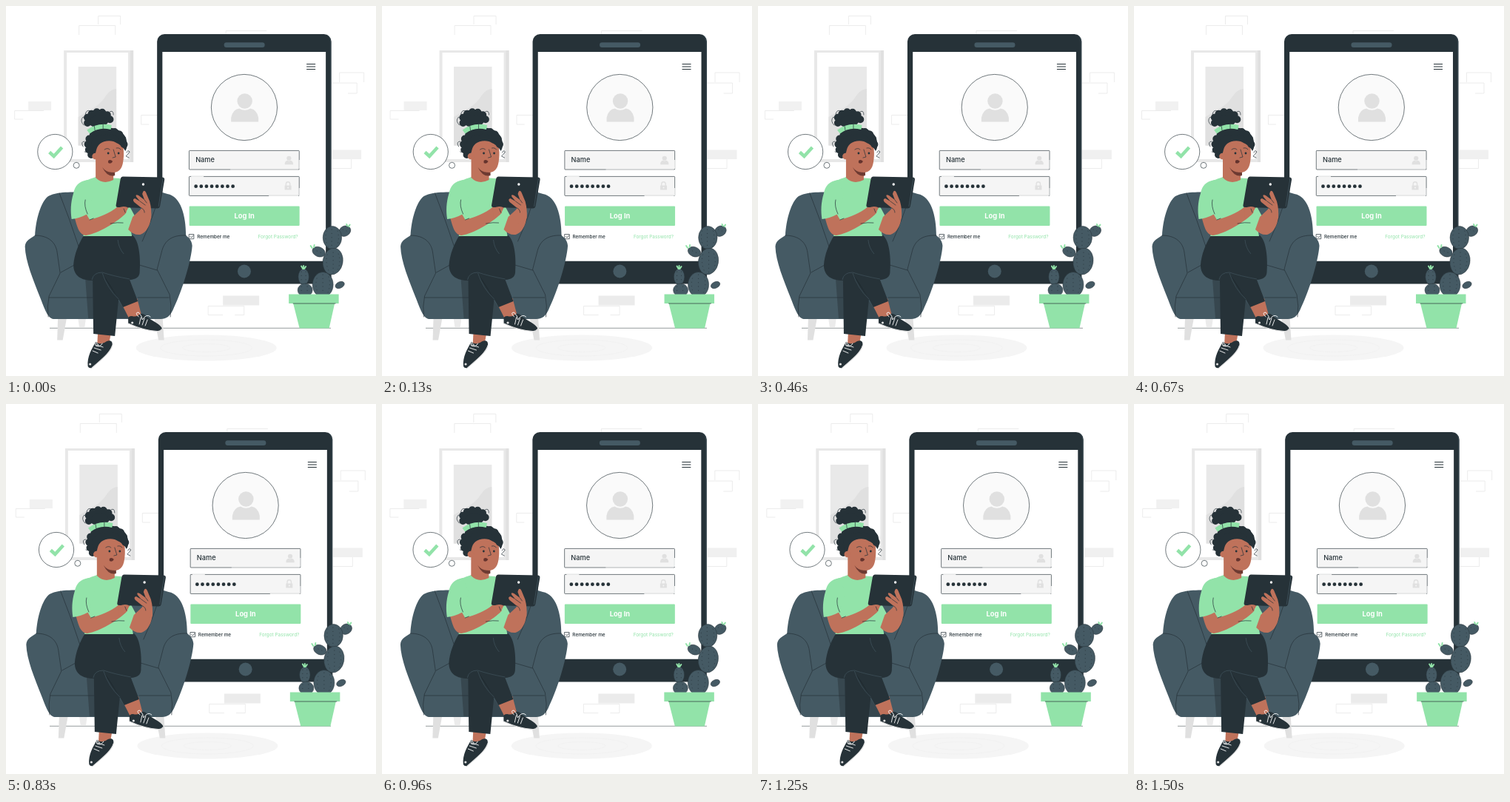
These frames come from a looping animation (500x500 px, 1540 ms). An HTML page:

```html
<!DOCTYPE html>
<html lang="en">
<head>
<meta charset="utf-8">
<title>Login illustration</title>
<style>
  html, body { margin: 0; width: 100%; height: 100%; overflow: hidden; background: #fff; }
  svg { display: block; width: 100vw; height: 100vh; }
  text { font-family: Inter, Roboto, sans-serif; }
  .dark { fill: #263238; }
  .slate { fill: #455a64; }
  .green { fill: #92e3a9; }
  .skin { fill: #bf725b; }
  .pale { fill: #e0e0e0; }
  .line { fill: none; stroke: #263238; stroke-width: .7; stroke-linecap: round; stroke-linejoin: round; }
  .lace { fill: none; stroke: #fff; stroke-width: .9; stroke-linecap: round; }
  .sole { fill: none; stroke: #e0e0e0; stroke-width: 1.2; stroke-linecap: round; }
  .brick { fill: none; stroke: #e8e8e8; stroke-width: .8; }
  .curls { fill: none; stroke: #263238; stroke-width: 10; stroke-linecap: round; stroke-dasharray: 0 7.5; }
</style>
</head>
<body>
<svg viewBox="0 0 500 500">
  <path d="M59 435.3H439" stroke="#8b9194" stroke-width=".9"/>
  <g id="scene">
    <g id="wall">
      <path class="brick" d="M124.500 25V13.500H154.500V25M98.500 39V26.500H147.500V39M11.500 153V141.500H51M11.500 153H23M450.500 103V90H483.500V103M440 104H474V118H462M440 219.500H466.500V207M182.500 160V147.500H205M182.500 160H193M297 38V33.500H352M273 405.500H321.500V417.500H309M273 405.500V417.500H293"/>
      <path fill="#f1f1f1" d="M30 129H61V141H30Z"/>
      <path fill="#f0f0f0" d="M440 194.500H480V207H440Z"/>
      <path fill="#ebebeb" d="M293 391.500H342V404.500H293Z"/>
      <path fill="#e8e8e8" d="M78 60H172V211H78Z"/>
      <path class="pale" d="M168 60H172V211H168Z"/>
      <path fill="#fff" d="M82 63H165V207H82Z"/>
      <path fill="#e9e9e9" d="M97.500 82H149V188.500H97.500Z"/>
      <path class="pale" d="M97.500 150C108 143 121 138 130 128C137 119 139 113 149 112V188.500H97.500Z"/>
    </g>
    <ellipse cx="270.500" cy="462" rx="95" ry="17.500" fill="#f5f5f5"/>
    <g fill="none" stroke="#efefef" stroke-width=".7">
      <ellipse cx="270.500" cy="462" rx="62" ry="11"/>
      <ellipse cx="270.500" cy="462" rx="32" ry="5.500"/>
    </g>

    <g id="phone">
      <rect class="dark" x="204" y="38" width="235.500" height="337.500" rx="10"/>
      <path fill="none" stroke="#455a64" stroke-width=".5" d="M434 39Q438.500 42 438.500 50V364"/>
      <path fill="#fff" d="M211.200 62H432V344.700H211.200Z"/>
      <rect class="slate" x="294.500" y="49.200" width="55" height="6.800" rx="3.300"/>
      <circle class="slate" cx="321.800" cy="358.500" r="9"/>
      <path d="M406 78.500H418M406 82H418M406 85.500H418" stroke="#263238" stroke-width="1.200"/>
      <circle cx="321.800" cy="137" r="44.600" fill="#fafafa" stroke="#263238" stroke-width=".65"/>
      <g id="user" class="pale">
        <circle cx="322.500" cy="128.500" r="10.200"/>
        <path d="M304 156.500V151Q306 140 315 138.500Q322.500 143 330 138.500Q339 140 341 151V156.500Z"/>
      </g>
      <g fill="#f5f5f5" stroke="#263238" stroke-width=".65">
        <rect x="247.300" y="195.400" width="148.800" height="25.600" rx=".8"/>
        <rect x="247.300" y="230.400" width="148.800" height="26" rx=".8"/>
      </g>
      <path stroke="#f5f5f5" stroke-width="1" d="M303 221H395M396.100 208V220M355 256.400H395M396.100 246V256M250 230.400H267"/>
      <text class="dark" x="256" y="211" font-size="9.200" font-weight="500">Name</text>
      <path stroke="#263238" stroke-width="4.800" stroke-linecap="round" stroke-dasharray="0 7.140" d="M256.500 243.700H307"/>
      <use href="#user" transform="translate(284.500 166.800) scale(.303)"/>
      <path class="pale" d="M376.500 242.500H385.500V248.500H376.500Z"/>
      <path d="M378.200 243V240.500A2.700 2.700 0 0 1 383.600 240.500V243" fill="none" stroke="#e0e0e0" stroke-width="1.400"/>
      <circle cx="381" cy="245.500" r="1" fill="#f5f5f5"/>
      <rect class="green" x="247.500" y="270.500" width="149" height="26.500" rx="1"/>
      <text x="322" y="286.900" font-size="9.300" font-weight="700" fill="#fff" text-anchor="middle">Log In</text>
      <path class="line" d="M247.500 308.500H253.700V314.700H247.500ZM249 311.500L250.500 313L253 310"/>
      <text class="dark" x="258" y="313.800" font-size="6.400" font-weight="500">Remember me</text>
      <text class="green" x="394.500" y="313.800" font-size="6.400" text-anchor="end">Forgot Password?</text>
    </g>

    <g id="plant">
      <g class="slate" stroke="#263238" stroke-width=".5">
        <ellipse cx="451" cy="377" rx="6.500" ry="4.200" transform="rotate(-25 451 377)"/>
        <ellipse cx="457.500" cy="304.500" rx="8.300" ry="6.800" transform="rotate(-30 457 304)"/>
        <ellipse cx="422.500" cy="332" rx="9" ry="6.500" transform="rotate(22 422 332)"/>
        <ellipse cx="440.800" cy="313" rx="12.700" ry="15.500"/>
        <ellipse cx="441.500" cy="345" rx="13.500" ry="18" transform="rotate(10 441 345)"/>
        <ellipse cx="402" cy="366" rx="7.300" ry="11"/>
        <ellipse cx="404" cy="384" rx="10" ry="9"/>
        <ellipse cx="428" cy="376.500" rx="14" ry="17"/>
      </g>
      <path class="line" stroke-dasharray=".3 5" d="M433 304Q430 315 435 325M440 302V326M448 304Q451 315 447 325M434 336Q431 347 436 358M442 333V361M449 335Q453 346 448 357M420 368Q417 377 421 387M428 363V388M436 366Q439 376 435 387M399 359V375M405 359V375M399 379V389M407 379V389M420 331L427 334M455 302L460 304"/>
      <path fill="none" stroke="#92e3a9" stroke-width="2" stroke-linecap="round" d="M461 297L460 295M463 298L464.500 295.500M413.500 327L411.500 324M416 326L416.500 323M401 355L399 351.500M402 355V351M403 355L405 352"/>
      <path class="green" d="M388 402H444L436.500 435.500H396.500ZM382 389.500H449.500V402H382Z"/>
      <path class="line" d="M388 402H445"/>
    </g>

    <g id="chair">
      <path class="pale" d="M70 421H82L76.500 451.500H69ZM200 421H211.500L213.500 451.500H206Z"/>
      <path fill="#ebebeb" d="M97 421H108L106 435H99Z"/>
      <path class="slate" d="M25.500 325C26 317 33 314 39 310C40 289 47 264 57 257C72 249 95 253 110 250C145 244 194 246 218 254C236 257 243 283 243 310C247 313 251 317 251.500 324C250 345 238 384 227 407C222 420 216 423 209 423H64C56 422 52 409 46 394C37 371 26 345 25.500 325Z"/>
      <path fill="#37474f" d="M107 368H119V422H111ZM150 395L159 409L170 422H148Z"/>
      <path class="line" d="M39 310C57 310 67 319 69 333L73 361L58 392Q55 406 57 420M74 360L94 349M243 310C222 309 213 319 210 333L204 356L221 390Q224 405 222 420M204 357L180 350M58 394H117M178 394H220M72 253Q86 288 98 325M208 253Q198 287 184 318"/>
    </g>

    <g id="woman">
      <path class="skin" d="M124 440H142L139 457L123 460Z"/>
      <path class="skin" d="M156 402L177 395L183 418L167 424Z"/>
      <path class="dark" d="M110.500 487C109 474 116 463 121 454Q129 459 136 453C141 451 144 453 143.500 458C141 469 126 480 116 489Q112 490 110.500 487Z"/>
      <path class="dark" d="M165 424Q164 419 170 419Q177 421 181 416Q186 415 190 420C198 426 207 429 210.500 435Q211 440 204 439.500C190 439 176 434 165 429Z"/>
      <path class="sole" d="M165 429C176 434 190 439 204 439.500Q209 440 210 437M143.500 459C141 469 126 480 116 489"/>
      <path class="lace" d="M117 466L124 469M119 462L128 465M122 458L131 461M125 458Q119 452 121 459Q127 462 130 456M180 430L182 421M184 431L187 422M188 432L191 424M179 420Q173 414 179 414Q184 419 184 424Q190 415 195 420"/>
      <circle cx="170.500" cy="428" r="1.600" fill="#e0e0e0"/>
      <circle cx="113.500" cy="484" r="1.600" fill="#e0e0e0"/>
      <path class="dark" d="M105 310H171C180 317 182 342 180.500 360Q180 369 167 370L178 399L158 407L152 396L147 446L118 443L117 371C102 371 91 365 91 350C92 336 98 321 105 310Z"/>
      <path fill="#1b252a" d="M130 362Q141 376 158 407L152 396Z"/>
      <path fill="none" stroke="#455a64" stroke-width=".6" d="M116 370Q118 360 130 360Q145 365 167 369M130 361Q137 382 152 396M151 316Q152 327 159 335"/>

      <path class="green" d="M121 231C108 236 97 238 92 251L106 285L108 300L104 311H170Q166 298 174 284L167 271L164 250L154 233Z"/>
      <path class="skin" d="M92 284C96 298 98 309 108 310C125 307 148 293 160 282L166 271H151C139 281 126 285 113 289L106 277Z"/>
      <path class="skin" d="M171 285L165 302Q172 310 181 309C194 305 198 285 195 275L184 273Z"/>
      <path class="green" d="M110 235C98 237 93 243 91 253C87 266 87 277 88.500 288Q99 287 110 281L118 255Z"/>
      <path class="line" d="M110 281Q105 270 107 262M141 294Q151 292 158 293M113 289L118 287"/>

      <path class="skin" d="M121 205V232Q131 242 145 235V215Z"/>
      <path fill="#6d3a32" d="M130 218Q137 227 147 224V229Q137 232 130 218Z"/>
      <ellipse class="dark" cx="124" cy="153" rx="15" ry="11"/>
      <path class="curls" d="M110 158Q107 150 115 146Q125 140 135 146Q143 151 139 158"/>
      <path class="line" d="M105 161Q99 155 104 150Q111 153 108 160M107 147Q108 139 114 142M140 143Q145 140 145 147M104 190Q100 183 106 183M106 197Q108 199 111 194M163 198Q164 194 167 197Q165 200 162 203L166 205"/>
      <path class="skin" d="M118 180H154C159 187 160 198 158 211Q156 224 146 225C136 224 128 216 122 207Z"/>
      <path class="dark" d="M113 203C106 188 110 171 122 167C136 161 154 165 160 175C165 184 164 192 161 196C157 188 151 186 145 183C138 181 131 183 127 186C121 191 122 198 119 205Z"/>
      <path class="curls" d="M115 201Q108 190 112 180Q121 168 136 170Q151 167 157 179L160 189"/>
      <circle class="skin" cx="120.500" cy="203" r="4.300"/>
      <path d="M111 170Q124 160 142 164" fill="none" stroke="#92e3a9" stroke-width="6"/>
      <path d="M119 161L120 168M131 160V166" class="line"/>
      <path class="line" d="M133 194Q137 191 140 194M149 192Q153 191 155 194M145 194L148 204L144 205"/>
      <g class="dark"><circle cx="138" cy="199" r="1.400"/><circle cx="152" cy="199" r="1.400"/></g>
      <path fill="#64332d" d="M138 209Q141 206.500 144 210Q142 214 138 212Z"/>

      <path class="dark" d="M158 230.500L211 231.500Q214.500 231.500 214 235L208 270Q207.500 273.500 204 273.500L151 272Q148 272 148.500 269L154.500 234Q155 230.500 158 230.500Z"/>
      <path d="M212 233L206 271" stroke="#455a64" stroke-width=".7"/>
      <circle cx="185.300" cy="241" r="1.700" fill="#fff"/>
      <path class="skin" d="M185 251Q187 248 189 252L194 264Q197 275 196 287L185 294L176 284Q181 277 183 273L173 265Q170 261 174 260L181 264L176 258Q174 254 179 256L187 262L184 254Z"/>
      <path class="skin" d="M150 274Q157 269 164 272L162 280L151 288Z"/>
      <path class="line" stroke-width=".6" d="M181 264L188 269M187 262L190 266M183 273Q187 275 187 279M159 274L161 279"/>
    </g>

    <g id="bubble" fill="#fff" stroke="#263238" stroke-width=".65">
      <circle cx="66.200" cy="197" r="23.600"/>
      <path d="M58.500 197.500L64.500 203L75.500 191" fill="none" stroke="#92e3a9" stroke-width="4.500"/>
      <circle cx="95" cy="215.300" r="4"/>
    </g>
  </g>
</svg>
<script>
  const LOOP = 1540, STEPS = 37, SCALE = 0.6, REST = 0.15;
  const shake = [0, -1, 2, -4, 4, -4, 4, -4, 2, -1, 0];
  const scene = document.getElementById('scene');

  // cubic-bezier(.25, .1, .25, 1)
  function ease(x) {
    let low = 0, high = 1;
    const curve = (s, a, b) => 3 * (1 - s) ** 2 * s * a + 3 * (1 - s) * s * s * b + s ** 3;
    for (let k = 0; k < 24; k++) {
      const mid = (low + high) / 2;
      if (curve(mid, .25, .25) < x) low = mid; else high = mid;
    }
    return curve(low, .1, 1);
  }

  function offset(time) {
    const step = Math.floor((time % LOOP) / LOOP * STEPS + 0.05);
    const position = Math.min(step, STEPS - 1) / (STEPS - 1) * 10;
    const i = Math.min(Math.floor(position), 9);
    return SCALE * (shake[i] + (shake[i + 1] - shake[i]) * ease(position - i)) + REST;
  }

  function draw() {
    scene.setAttribute('transform', `translate(${offset(performance.now()).toFixed(3)} 0)`);
    requestAnimationFrame(draw);
  }
  draw();
</script>
</body>
</html>
```
